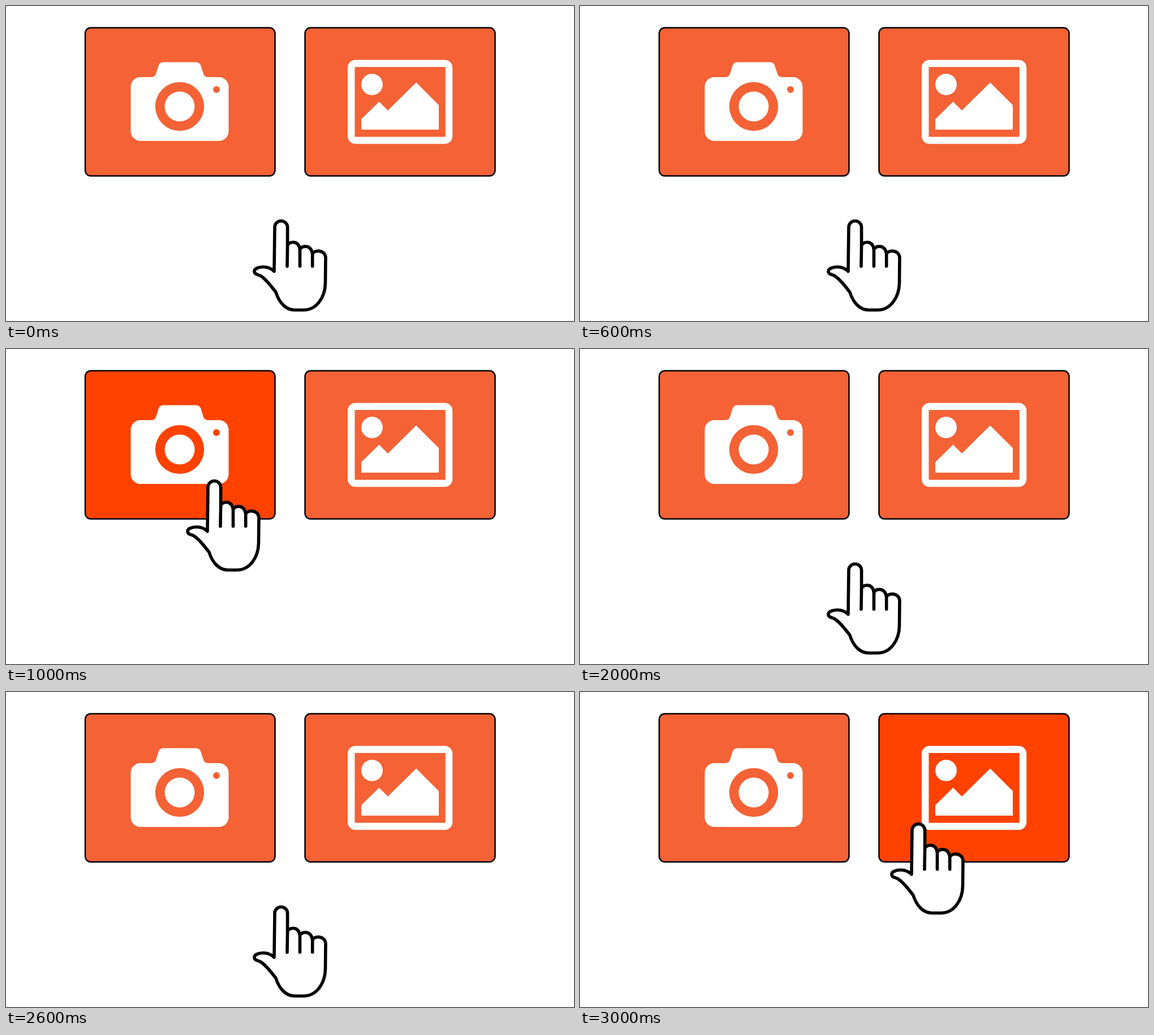
These frames come from a looping animation (1004x558 px, 4000 ms). An HTML page:

```html
<!DOCTYPE html>
<html lang="en">
<head>
<meta charset="utf-8">
<title>Choose camera or gallery</title>
<style>
  html, body { margin: 0; width: 100%; height: 100%; overflow: hidden; background: #fff; }
  svg { display: block; width: 100%; height: 100%; }

  .tile { fill: #f46235; stroke: #000; stroke-width: 2.5; }
  .icon { fill: #fff; fill-rule: evenodd; }
  .hand { fill: #fff; stroke: #000; stroke-width: 5.6; stroke-linecap: round; stroke-linejoin: round; }

  .tile, .hand { animation: 4s step-end infinite; }
  .camera { animation-name: press-camera; }
  .gallery { animation-name: press-gallery; }
  .hand { animation-name: point; }

  @keyframes press-camera {
    0%, 50%, 100% { fill: #f46235; }
    25% { fill: #ff4200; }
  }
  @keyframes press-gallery {
    0%, 100% { fill: #f46235; }
    75% { fill: #ff4200; }
  }
  @keyframes point {
    0%, 50%, 100% { transform: translate(0, 0); }
    25% { transform: translate(-118px, -147px); }
    75% { transform: translate(112px, -147px); }
  }
</style>
</head>
<body>
<svg viewBox="0 0 1004 558">
  <rect class="tile camera" x="140" y="38.5" width="335.5" height="262.5" rx="10"/>
  <rect class="tile gallery" x="528.5" y="38.5" width="336" height="262.5" rx="10"/>

  <!-- camera body, lens ring and flash dot -->
  <path class="icon" d="M237.500 126H257Q263.500 126 265.500 119L269.500 106Q271.500 99.500 278 99.500H336
    Q342.500 99.500 344.500 106L348.500 119Q350.500 126 357 126H376.500a17 17 0 0 1 17 17V222
    a17 17 0 0 1 -17 17H237.500a17 17 0 0 1 -17 -17V143a17 17 0 0 1 17 -17Z
    M263.800 178a43.200 43.200 0 1 0 86.400 0a43.200 43.200 0 1 0 -86.400 0Z
    M280.500 178a26.500 26.500 0 1 0 53 0a26.500 26.500 0 1 0 -53 0Z
    M366 148a6 6 0 1 0 12 0a6 6 0 1 0 -12 0Z"/>

  <!-- framed landscape -->
  <rect x="610.200" y="101.700" width="172.800" height="136.300" rx="7.500" fill="none" stroke="#fff" stroke-width="12.500"/>
  <circle class="icon" cx="647" cy="139" r="19"/>
  <path class="icon" d="M628 219V200.500L659.500 169.500L675 185L725 135.500L765 175.500V219Z"/>

  <g class="hand">
    <path d="M474 470L475 392a11.300 11.300 0 0 1 22.600 0V424
      C500 417 517 414 519.500 431C523 424 539 422 541.700 439C545 432 563 431 565 445
      L564.500 491C564 516 549 538.500 526 538.500H510C495 538.500 483 526 477 507
      C470 498 460 484 450 478C445 475 439.500 476 439 470.500C438.500 465 447 462.500 454 462.300
      C462 462 469 465 474 470Z"/>
    <path d="M497.600 424L497 461M519.500 431V461M541.700 439V461" fill="none"/>
  </g>
</svg>
</body>
</html>
```
